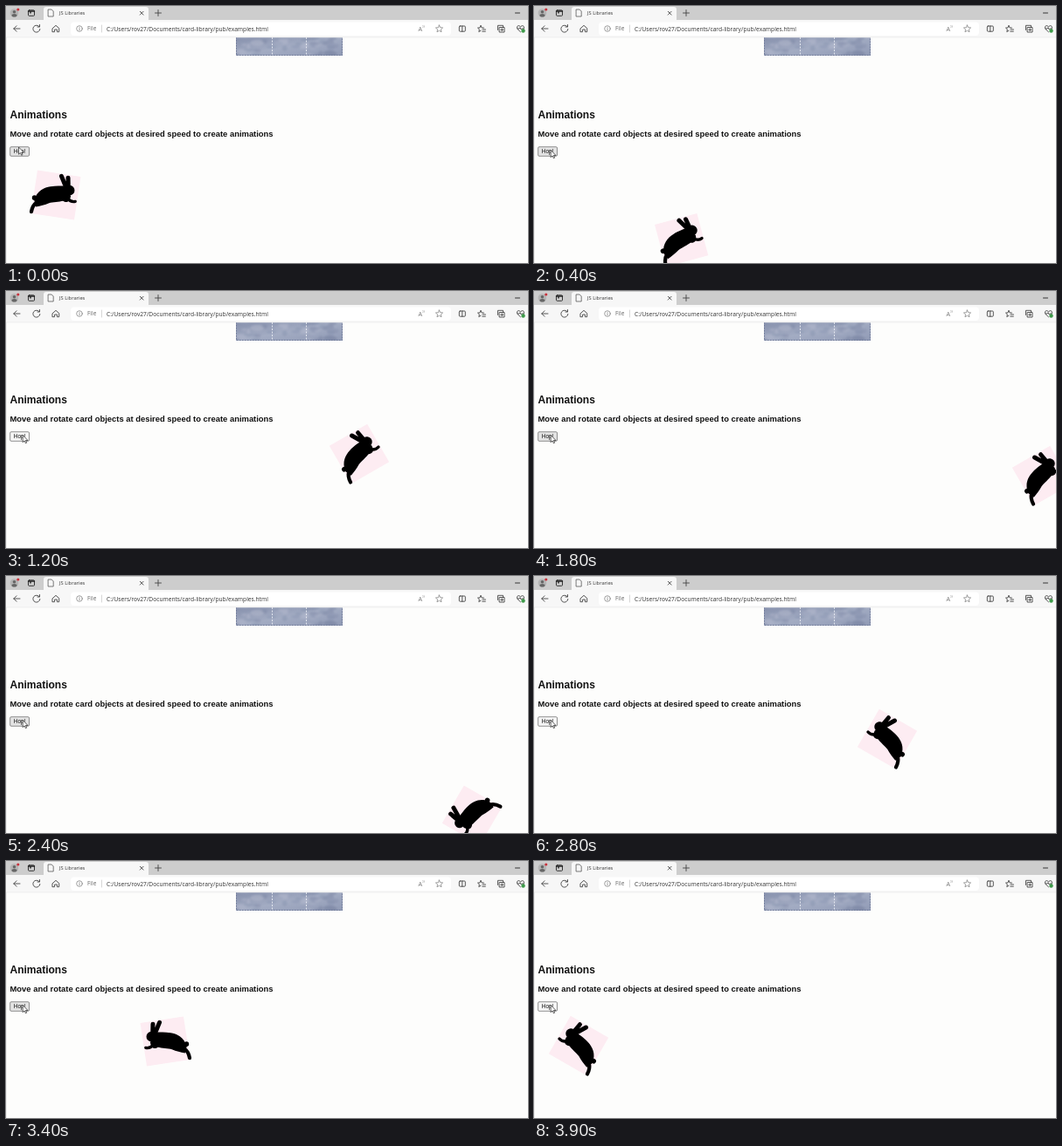
An HTML page for the animation above (4000 ms loop, 597 by 295 pixels).

```html
<!DOCTYPE html>
<html lang="en">
<head>
<meta charset="utf-8">
<title>JS Libraries</title>
<style>
  html, body { margin: 0; width: 100%; height: 100%; overflow: hidden; background: #fdfdfc; }
  svg { display: block; width: 597px; height: 295px; }
  .ui { font-family: "Open Sans", "Noto Sans", sans-serif; fill: #333; }
  .page { font-family: "Liberation Sans", Arial, sans-serif; fill: #111; }
  .bold { font-weight: 700; }
  .icon { fill: none; stroke: #444; stroke-width: .9; stroke-linecap: round; stroke-linejoin: round; }
  .thin { stroke: #777; stroke-width: .7; }
  .limb { fill: none; stroke: #000; stroke-linecap: round; }
</style>
</head>
<body>
<svg viewBox="0 0 597 295">
  <defs>
    <linearGradient id="sky" x2="1" y2="1">
      <stop offset="0" stop-color="#8690ac"/>
      <stop offset=".5" stop-color="#a3acc3"/>
      <stop offset="1" stop-color="#8f99b4"/>
    </linearGradient>
    <clipPath id="frame"><rect x="263" y="36" width="122" height="21"/></clipPath>
    <filter id="soft"><feGaussianBlur stdDeviation="1.3"/></filter>
  </defs>

  <rect width="597" height="295" fill="#fdfdfc"/>
  <path d="M.5 36V295" stroke="#ececec"/>

  <g clip-path="url(#frame)">
    <rect x="263" y="36" width="122" height="21" fill="url(#sky)"/>
    <g id="clouds" filter="url(#soft)"></g>
    <path d="M304.5 36V57M343.5 36V57" stroke="#e8ebf2" stroke-width=".9" stroke-dasharray="2 1.5"/>
  </g>
  <path d="M263.5 36V56.5H384.5V36" fill="none" stroke="#6f7997" stroke-dasharray="1.5"/>

  <g class="page bold">
    <text x="4.5" y="128.5" font-size="12">Animations</text>
    <text x="4.5" y="150" font-size="9.42">Move and rotate card objects at desired speed to create animations</text>
  </g>
  <rect id="button" x="4.7" y="161.7" width="21.8" height="10.6" rx="1.3" stroke="#777" stroke-width=".8"/>
  <text class="page" x="8.8" y="169.3" font-size="6.4">Hop!</text>

  <g id="card">
    <rect x="-25" y="-25" width="50" height="50" fill="#fdecf2"/>
    <g transform="rotate(-10)">
      <path d="M-25 5C-21 -6 -13 -9 -6 -10C2 -11 8 -10 13 -10L17 2C15 10 11 9 8 7C4 8 -4 8 -8 9C-13 11 -18 12 -23 13Z"/>
      <ellipse cx="16" cy="-5" rx="5.6" ry="5.8"/>
      <circle cx="-24.5" cy="2.5" r="2.8"/>
      <path class="limb" stroke-width="5" d="M11 -11L7 -21.5M14.5 -10V-19.5"/>
      <path class="limb" stroke-width="4.2" d="M-22 8Q-27 11 -28.5 18.5"/>
      <path class="limb" stroke-width="3.4" d="M13 4Q17 9 22 8"/>
    </g>
  </g>

  <path id="cursor" d="M0 0V8.2L1.9 6.5L3.2 9.3L4.5 8.7L3.2 6H5.8Z" fill="#fff" stroke="#222" stroke-width=".7"/>

  <rect width="597" height="17" fill="#cdcdcd"/>
  <rect y="16" width="597" height="20" fill="#f7f7f7"/>
  <rect x="43" y="1" width="120" height="20" rx="3" fill="#f7f7f7"/>
  <rect x="74" y="18.5" width="435" height="15.5" rx="4" fill="#fff"/>
  <path d="M0 36H597" stroke="#e6e6e6" stroke-width=".6"/>

  <circle cx="9.5" cy="8" r="4.8" fill="#b5b5b5"/>
  <circle cx="9.5" cy="6.7" r="1.8" fill="#666"/>
  <ellipse cx="9.5" cy="10.8" rx="3" ry="1.8" fill="#666"/>
  <circle cx="13.8" cy="4" r="1.6" fill="#c8323c"/>
  <g class="icon">
    <rect x="25.5" y="4.8" width="7" height="6.5" rx="1" stroke="#222"/>
    <path d="M25.5 6H32.5M28 6V8" stroke="#222" stroke-width="1.4"/>
    <path d="M48.5 4H52.2L54.2 6V12H48.5Z" stroke-width=".7"/>
    <path d="M153.3 6.3l3.8 3.8m0 -3.8l-3.8 3.8"/>
    <path d="M170.5 8h7M174 4.5v7"/>
    <path d="M582.5 8h5" stroke="#222"/>
    <path d="M16 26H8.8M12 22.8L8.8 26L12 29.2"/>
    <path d="M38 23.6A4 4 0 1 0 38.9 26.5M38.5 21.5V24H36"/>
    <path d="M53.3 25.6L57 22.3L60.7 25.6V29.7H58.4V27H55.6V29.7H53.3Z"/>
    <circle class="thin" cx="84" cy="26" r="3.3"/>
    <path class="thin" d="M84 25.6v2.1M84 24.3v.1"/>
    <path d="M109.5 22v8" stroke="#bbb" stroke-width=".6"/>
    <path id="star" class="thin"/>
    <rect x="518.3" y="23" width="7" height="6.2" rx="1"/>
    <path d="M521.8 23v6.2"/>
    <path d="M543 22.5l1 2.4l2.5 .2M543 22.5l-1 2.4l-2.5 .2l1.9 1.8l-.6 2.7l2.2 -1.3M545 27h3.5M544.8 29.2h3.5"/>
    <path d="M568.5 24.3v-2h-6v5.2M564.5 24.5h5.5v5.5h-5.5ZM567.2 25.8v2.9M565.8 27.2h2.9"/>
    <path d="M588.5 29.8L585 26.5C583 23 587 21 588.5 24.2C590 21 594 23 592 26.5M585 26h2l1 -1.2l1.2 2.2l.8 -1h2"/>
  </g>
  <circle cx="591.5" cy="28.5" r="2.2" fill="#3f9b4b"/>
  <g class="ui">
    <text x="61" y="10.3" font-size="5.75">JS Libraries</text>
    <text x="93" y="28.4" font-size="6.5" fill="#666">File</text>
    <text x="115" y="28.5" font-size="6.67">C:/Users/rov27/Documents/card-library/pub/examples.html</text>
    <text x="471.5" y="28.5" font-size="7.2" fill="#777">A</text>
    <text x="476.3" y="25.3" font-size="4" fill="#777">))</text>
  </g>
</svg>
<script>
  const LOOP = 4000, STEP = 100;
  const $ = id => document.getElementById(id);
  const ramp = (t, from, span) => Math.min(Math.max((t - from) / span, 0), 1);

  // time, x, y
  const path = [
    [0, 57, 217], [300, 139, 303], [600, 228, 200], [900, 316, 303],
    [1200, 404, 187], [1500, 492, 303], [1800, 581, 212], [2180, 581, 212],
    [2500, 511, 303], [2800, 404, 187], [3100, 303, 303], [3370, 192, 198],
    [3400, 182, 207], [3560, 120, 303], [3700, 68, 248], [3850, 51, 212], [LOOP, 51, 212]
  ];
  // crest and dip of each hop
  const hops = [[-30, 300], [600, 900], [1200, 1500], [2180, 2500], [2800, 3100], [3370, 3560]];
  const presses = [[600, 700], [1200, 1300], [2700, 2900], [3900, 4000]];

  function draw(t) {
    const i = path.findIndex(k => k[0] > t);
    const [t0, x0, y0] = path[i - 1], [t1, x1, y1] = path[i];
    const p = (t - t0) / (t1 - t0);
    const x = x0 + (x1 - x0) * p, y = y0 + (y1 - y0) * p;
    const tilt = hops.reduce((sum, [crest, dip]) => sum + ramp(t, crest, 70) - ramp(t, dip, 120), 0);
    const facing = 1 - 2 * ramp(t, 1900, 200);
    $('card').setAttribute('transform',
      `translate(${x} ${y}) scale(${facing} 1) rotate(${90 * tilt - 30})`);

    const down = presses.some(([from, to]) => t >= from && t < to);
    $('button').setAttribute('fill', down ? '#f5f5f5' : '#e3e3e3');
    const c = ramp(t, 0, 300);
    $('cursor').setAttribute('transform', `translate(${14.5 + 4.7 * c} ${162 + 3.5 * c})`);
  }

  function paintStar() {
    const points = Array.from({ length: 10 }, (_, i) => {
      const r = i % 2 ? 2 : 4.3, a = i * Math.PI / 5;
      return `${495.5 + r * Math.sin(a)} ${26.3 - r * Math.cos(a)}`;
    });
    $('star').setAttribute('d', `M${points.join('L')}Z`);
  }

  function paintClouds() {
    let seed = 7;
    const rnd = () => (seed = seed * 16807 % 2147483647) / 2147483647;
    const tones = ['#7d88a6', '#b3bacd', '#98a2bb', '#8893b0'];
    for (let i = 0; i < 50; i++) {
      const e = document.createElementNS('http://www.w3.org/2000/svg', 'ellipse');
      const attrs = {
        cx: 263 + rnd() * 122, cy: 36 + rnd() * 21,
        rx: 2 + rnd() * 6, ry: 1 + rnd() * 2.5,
        fill: tones[i % tones.length], opacity: .5
      };
      for (const name in attrs) e.setAttribute(name, attrs[name]);
      $('clouds').append(e);
    }
  }

  const start = performance.now();
  function tick() {
    const t = (performance.now() - start) % LOOP;
    draw(Math.floor(t / STEP) * STEP);
    requestAnimationFrame(tick);
  }
  paintStar();
  paintClouds();
  tick();
</script>
</body>
</html>
```
